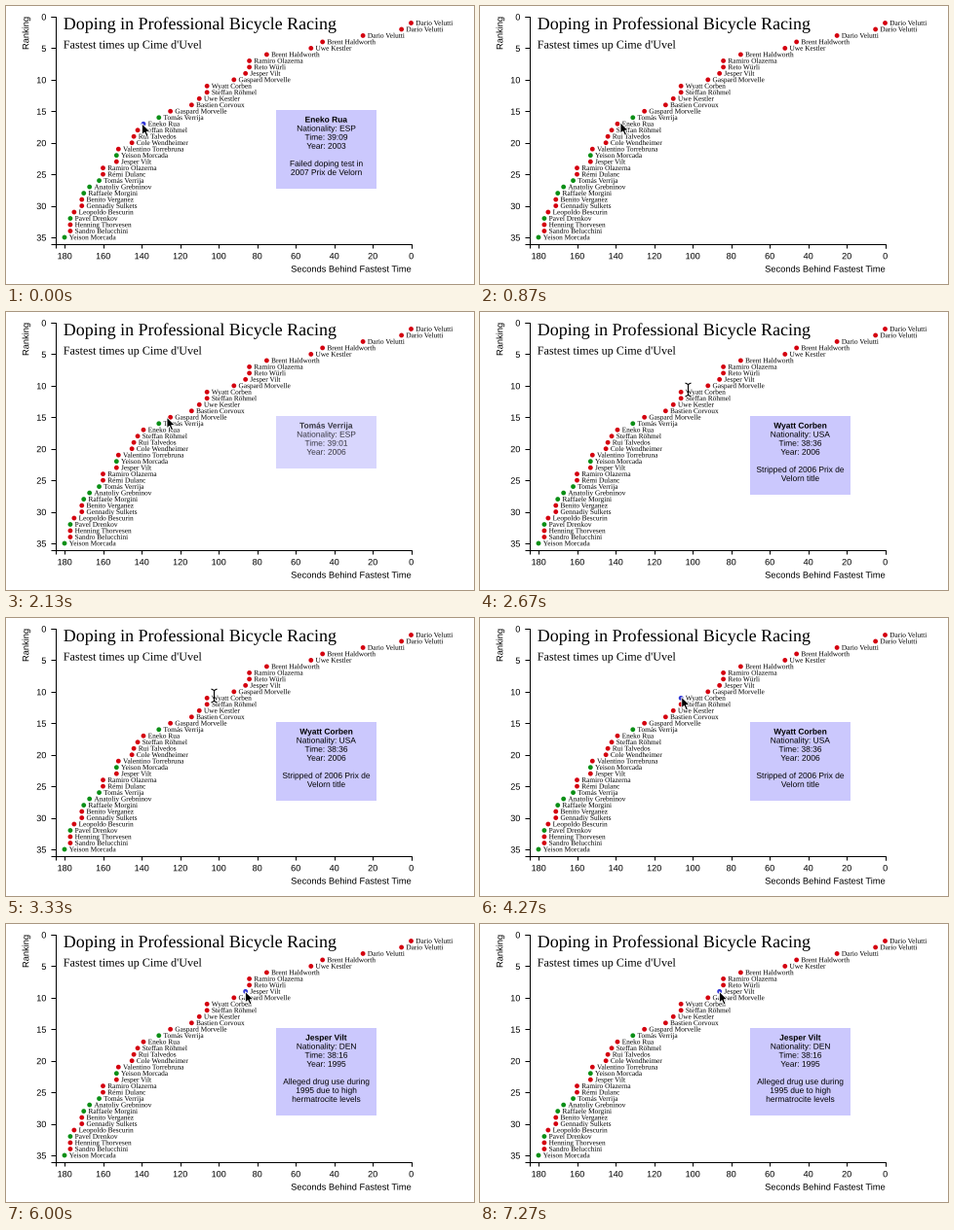
These frames come from a looping animation (480x286 px, 7340 ms). A matplotlib script:

```python
import math

import matplotlib.pyplot as plt
import numpy as np
from matplotlib.animation import FuncAnimation
from matplotlib.patches import Circle, PathPatch, Polygon, Rectangle
from matplotlib.path import Path
from matplotlib.textpath import TextPath
from matplotlib.transforms import Affine2D

W, H, DPI = 480, 286, 100
PX = 72 / DPI
LOOP, INTERVAL = 7340, 20
FADE = 130

RED, GREEN, BLUE = "#d4000f", "#0b8f16", "#3338d6"
TIP_COLOR = "#cbc8fd"
SERIF, SANS = "Liberation Serif", "Liberation Sans"

# (seconds behind the fastest time, rider), in order of rank
RIDERS = [
    (0, "Dario Velutti"), (5, "Dario Velutti"), (25, "Dario Velutti"),
    (46, "Brent Haldworth"), (52, "Uwe Kestler"), (75, "Brent Haldworth"),
    (84, "Ramiro Olazerna"), (84, "Reto Würli"), (86, "Jesper Vilt"),
    (92, "Gaspard Morvelle"), (106, "Wyatt Corben"), (106, "Steffan Röhmel"),
    (110, "Uwe Kestler"), (114, "Bastien Corvoux"), (125, "Gaspard Morvelle"),
    (131, "Tomás Verrija"), (139, "Eneko Rua"), (142, "Steffan Röhmel"),
    (144, "Rui Talvedos"), (145, "Cole Wendheimer"),
    (152, "Valentino Torrebruna"), (153, "Yeison Morcada"),
    (153, "Jesper Vilt"), (160, "Ramiro Olazerna"), (160, "Rémi Dulanc"),
    (162, "Tomás Verrija"), (167, "Anatoliy Grebninov"),
    (170, "Raffaele Morgini"), (171, "Benito Verganez"),
    (171, "Gennadiy Sulkets"), (175, "Leopoldo Bescurin"),
    (177, "Pavel Drenkov"), (177, "Henning Thorvesen"),
    (177, "Sandro Belucchini"), (180, "Yeison Morcada"),
]
CLEAN = {16, 22, 26, 27, 28, 32, 35}

# rank: (nationality, time, year, note lines)
DETAILS = {
    17: ("ESP", "39:09", 2003, ["Failed doping test in", "2007 Prix de Velorn"]),
    16: ("ESP", "39:01", 2006, []),
    11: ("USA", "38:36", 2006, ["Stripped of 2006 Prix de", "Velorn title"]),
    9: ("DEN", "38:16", 1995, ["Alleged drug use during", "1995 due to high",
                               "hermatrocite levels"]),
}

# (rank, start, end) in ms
HOVERS = [(17, -500, 600), (16, 1450, 1950), (11, 2330, 2500),
          (11, 3800, 4700), (9, 5500, 9000)]
TIPS = [(17, -500, 620), (16, 1450, 2230), (11, 2300, 4740), (9, 5500, 9000)]
IBEAM = (2520, 3500)

# pointer path: (ms, x, y)
POINTER = [(0, 139.5, 121), (450, 139.5, 121), (800, 144, 119.8),
           (1000, 144, 119.8), (1500, 156.5, 114.8), (1850, 156.5, 114.8),
           (2130, 165, 108.3), (2400, 206.5, 82), (2600, 213.5, 80),
           (3400, 213.5, 80), (3900, 206.8, 81.3), (4600, 206.8, 81.3),
           (5330, 249, 69.5), (5600, 245.5, 69.5), (LOOP, 245.5, 69.5)]


def sx(seconds):
    return 415.5 - 1.975 * seconds


def sy(rank):
    return 11 + 6.485 * rank


fig = plt.figure(figsize=(W / DPI, H / DPI), dpi=DPI, facecolor="white")
ax = fig.add_axes([0, 0, 1, 1])
ax.set(xlim=(0, W), ylim=(H, 0))
ax.axis("off")


def text(x, y, string, size, family=SANS, align=0, angle=0, weight="normal", z=2):
    """Draw text on baseline y; align 0 is left, 0.5 centre, 1 right."""
    path = TextPath((0, 0), string, size=size,
                    prop={"family": family, "weight": weight})
    shift = -align * path.get_extents().x1
    place = Affine2D().translate(shift, 0).rotate_deg(angle).scale(1, -1).translate(x, y)
    patch = PathPatch(place.transform_path(path), fc="black", lw=0, snap=False, zorder=z)
    return ax.add_patch(patch)


def stroke(xs, ys):
    ax.plot(xs, ys, color="black", lw=PX, solid_capstyle="butt",
            solid_joinstyle="miter", zorder=1)


def draw_axes():
    left, right, top, bottom = 50.5, 415.5, sy(0), 244.5
    stroke([left, left, right, right], [bottom + 4.5, bottom, bottom, bottom + 4.5])
    stroke([left - 4.5, left, left, left - 4.5], [top, top, bottom, bottom])
    for seconds in range(0, 181, 20):
        stroke([sx(seconds)] * 2, [bottom, bottom + 4.5])
        text(sx(seconds), 260.3, str(seconds), 9.1, align=0.5)
    for rank in range(0, 36, 5):
        stroke([left - 4.5, left], [sy(rank)] * 2)
        text(41, sy(rank) + 3.5, str(rank), 9.1, align=1)
    text(415.3, 273.6, "Seconds Behind Fastest Time", 9.3, align=1)
    text(23.3, 11.5, "Ranking", 9.3, align=1, angle=90)


def draw_riders():
    dots = {}
    for rank, (seconds, name) in enumerate(RIDERS, 1):
        x, y = sx(seconds), sy(rank)
        dots[rank] = ax.add_patch(Circle((x, y), 2.4, lw=0, zorder=2))
        text(x + 4.7, y + 2.3, name, 7.35, SERIF, z=3)
    return dots


def draw_tip(rank):
    nation, time, year, note = DETAILS[rank]
    lines = [RIDERS[rank - 1][1], f"Nationality: {nation}", f"Time: {time}", f"Year: {year}"]
    if note:
        lines += [""] + note
    box = Rectangle((277, 107), 103, 18 + 9.05 * len(lines), fc=TIP_COLOR, lw=0, zorder=4)
    parts = [ax.add_patch(box)]
    for i, line in enumerate(lines):
        if line:
            parts.append(text(328.3, 119.6 + 9.05 * i, line, 8.4, align=0.5,
                              weight="normal" if i else "bold", z=5))
    return parts


def draw_arrow():
    outline = [(0, 0), (0, 11.4), (2.6, 9), (4.6, 13.4), (6.5, 12.5), (4.6, 8.3), (8.2, 8.1)]
    return [ax.add_patch(Polygon(outline, fc="black", ec="white", lw=0.8 * PX,
                                 joinstyle="miter", zorder=9))]


def draw_ibeam():
    points = [(-3, -7), (0, -5.5), (3, -7), (0, -5.5), (0, 5.5),
              (-3, 7), (0, 5.5), (3, 7), (-1.5, 2), (1.5, 2)]
    codes = [1, 2, 2, 1, 2, 1, 2, 2, 1, 2]
    path = Path(points, codes)
    return [ax.add_patch(PathPatch(path, fc="none", ec=color, lw=width * PX, zorder=z))
            for color, width, z in (("white", 2.4, 8), ("black", 1.1, 9))]


text(58.8, 24, "Doping in Professional Bicycle Racing", 17.95, SERIF)
text(58.8, 43.6, "Fastest times up Cime d'Uvel", 12.1, SERIF)
draw_axes()
dots = draw_riders()
tips = {rank: draw_tip(rank) for rank in DETAILS}
arrow, ibeam = draw_arrow(), draw_ibeam()


def pointer_at(t):
    for (t0, *start), (t1, *end) in zip(POINTER, POINTER[1:]):
        if t <= t1:
            u = (t - t0) / (t1 - t0)
            return np.array(start) + (np.array(end) - start) * u * u * (3 - 2 * u)
    return POINTER[-1][1:]


def tip_alpha(t, start, end):
    return float(np.clip(min((t - start) / FADE, (end - t) / FADE), 0, 1))


def update(frame):
    t = math.floor((frame * INTERVAL + 15) * 0.015) / 0.015
    hovered = {rank for rank, start, end in HOVERS if start <= t < end}
    for rank, dot in dots.items():
        dot.set_facecolor(BLUE if rank in hovered else GREEN if rank in CLEAN else RED)
    for rank, start, end in TIPS:
        alpha = tip_alpha(t, start, end)
        for part in tips[rank]:
            part.set_alpha(alpha)
            part.set_visible(alpha > 0)
    place = Affine2D().translate(*pointer_at(t)) + ax.transData
    over_text = IBEAM[0] <= t < IBEAM[1]
    for parts, shown in ((arrow, not over_text), (ibeam, over_text)):
        for part in parts:
            part.set_transform(place)
            part.set_visible(shown)
    return []


anim = FuncAnimation(fig, update, frames=LOOP // INTERVAL, interval=INTERVAL,
                     repeat=True, repeat_delay=0)
plt.show()
```
